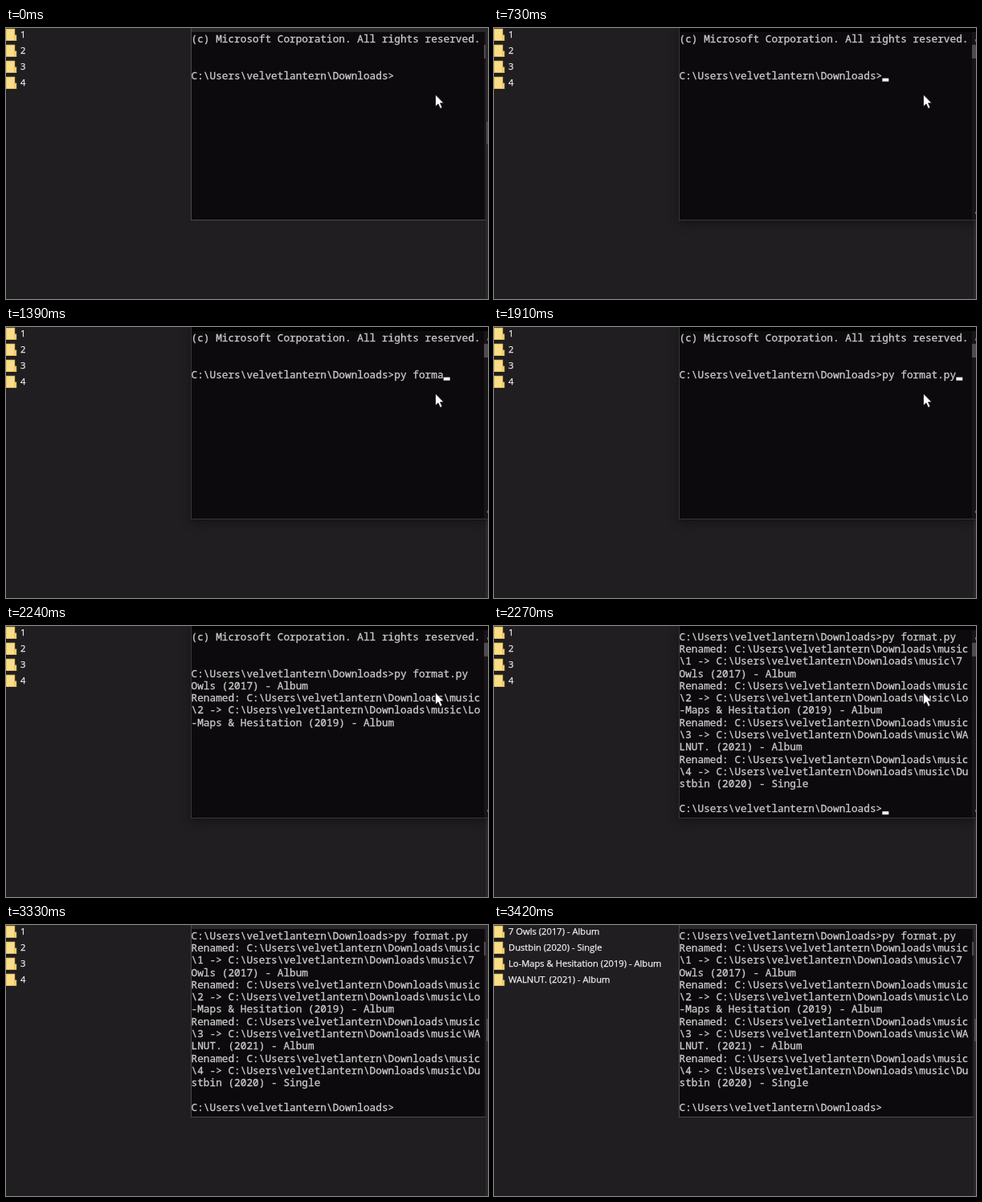
These frames come from a looping animation (600x338 px, 4.09 s). An HTML page:

```html
<!DOCTYPE html>
<html lang="en">
<head>
<meta charset="utf-8">
<title>Batch rename</title>
<style>
  html, body { margin: 0; width: 100%; height: 100%; overflow: hidden; background: #201e20; }
  body { position: relative; }
  div, pre, svg { position: absolute; margin: 0; box-sizing: border-box; }

  .folders { left: 0; top: 0; }
  .folders svg { left: 0; width: 14px; height: 17px; }
  .folders div { left: 18px; color: #f2f2f2; font: 11.2px/20.2px "Open Sans", "Noto Sans", sans-serif; white-space: pre;
    -webkit-text-stroke: .25px #f2f2f2; }

  .strip { left: 597px; top: 0; width: 3px; height: 338px; background: #2b292b; z-index: 2; }
  .strip div { left: 1px; top: 117px; width: 2px; height: 28px; background: #4b494b; }

  .console { left: 230px; top: 0; width: 371px; height: 240px; z-index: 1;
    background: #0c0a0c; border: solid #4c4a4c; border-width: 0 0 1px 1px; }
  .console.focused { z-index: 3; border-color: #383638; box-shadow: 0 3px 12px rgba(0, 0, 0, .4); }
  .title { left: 0; top: 0; width: 370px; height: 5px; background: #2a282a; }
  .focused .title { background: #030203; }
  .track { left: 364px; top: 5px; width: 6px; height: 234px; background: #171517; }
  .thumb { left: 0; top: 16px; width: 6px; height: 17px; background: #4d4b4d; }
  .tick { left: 4px; width: 2px; height: 3px; background: #6b696b; }
  pre { left: -.5px; top: 5.6px; color: #ccc; font: 12.77px/15.32px "Noto Sans Mono", "DejaVu Sans Mono", monospace;
    font-variant-ligatures: none; -webkit-text-stroke: .3px #ccc; }
  .caret { width: 7.7px; height: 3.8px; background: #f2f2f2; }
  .pointer { left: 0; top: 0; width: 14px; height: 21px; z-index: 4; }
</style>
</head>
<body>
<div class="folders"></div>
<div class="strip"><div></div></div>
<div class="console">
  <div class="title"></div>
  <pre></pre>
  <div class="caret"></div>
  <div class="track">
    <div class="thumb"></div>
    <div class="tick" style="top:9px"></div>
    <div class="tick" style="top:224px"></div>
  </div>
</div>
<svg class="pointer" viewBox="-1 -1 14 21">
  <path d="M0 0V15L3.5 11.8 6 17.4 8.6 16.2 6.1 10.8H10.6Z" fill="#fff" stroke="#0a0a0a" stroke-width=".8"/>
</svg>
<script>
const LOOP = 4090, COLS = 47, CELL_W = 7.662, CELL_H = 15.32;
const FOCUS = 180, BLUR = 3330, RELABEL = 3360;
const ENTER = 2060, REDRAW = 2240, DONE = 2270, CARET_OFF = 2850;
const home = "C:\\Users\\velvetlantern\\Downloads";
const prompt = home + ">";
const command = "py format.py";
const keyTimes = [790, 850, 940, 1030, 1090, 1180, 1270, 1390, 1520, 1610, 1790, 1880];
const albums = ["7 Owls (2017) - Album", "Lo-Maps & Hesitation (2019) - Album",
                "WALNUT. (2021) - Album", "Dustbin (2020) - Single"];

const find = selector => document.querySelector(selector);
const consoleBox = find(".console"), screen = find("pre"), caret = find(".caret"), pointer = find(".pointer");

const wrap = text => text.match(new RegExp(`.{1,${COLS}}`, "g"));
const renames = albums.map((name, i) =>
  wrap(`Renamed: ${home}\\music\\${i + 1} -> ${home}\\music\\${name}`));
const header = ["(c) Microsoft Corporation. All rights reserved.", "", ""];
const finished = [prompt + command, ...renames.flat(), "", prompt];
const halfDrawn = [...header, prompt + command, renames[0][2], ...renames[1]];

const numbers = albums.map((_, i) => String(i + 1));
const sorted = [...albums].sort();
const labels = numbers.map((_, i) => {
  const y = i * 20.15;
  find(".folders").insertAdjacentHTML("beforeend",
    `<svg style="top:${y}px" viewBox="0 0 14 17">
      <path d="M0 .8H11.2V8.6H13.2V16H0Z" fill="#dcb659"/>
      <path d="M.6 1.6H10.4V15.2H.6Z" fill="#f9dd88"/>
      <path d="M11 9.4H12.5V15.2H11Z" fill="#f3d077"/>
    </svg><div style="top:${y - 2.3}px"></div>`);
  return find(".folders").lastElementChild;
});

const setText = (node, text) => { if (node.textContent !== text) node.textContent = text; };

// Rows on screen plus the caret cell [column, row], or null while it is hidden
function terminal(t) {
  if (t >= DONE) return [finished, t < CARET_OFF ? [prompt.length, finished.length - 1] : null];
  if (t >= REDRAW) return [halfDrawn, null];
  const typed = keyTimes.filter(k => k <= t).length;
  const rows = [...header, prompt + command.slice(0, typed)];
  if (t >= ENTER) return [rows, [0, 4]];
  return [rows, t >= 730 ? [prompt.length + typed, 3] : null];
}

function pointerAt(t) {
  if (t < 2850) return [534.5, 83];
  if (t < 2880) return [548, 104];
  return t < 2910 ? [574, 146] : null;
}

function place(node, spot) {
  node.style.visibility = spot ? "visible" : "hidden";
  if (spot) node.style.transform = `translate(${spot[0]}px, ${spot[1]}px)`;
}

function render(t) {
  const [rows, cell] = terminal(t);
  setText(screen, rows.join("\n"));
  place(caret, cell && [cell[0] * CELL_W - .5, 5.4 + (cell[1] + 1) * CELL_H - 4]);
  const tip = pointerAt(t);
  place(pointer, tip && [tip[0] - 1, tip[1] - 1]);
  consoleBox.classList.toggle("focused", t >= FOCUS && t < BLUR);
  const names = t >= RELABEL ? sorted : numbers;
  labels.forEach((label, i) => setText(label, names[i]));
}

const start = performance.now();
function tick() {
  render((performance.now() - start) % LOOP);
  requestAnimationFrame(tick);
}
tick();
</script>
</body>
</html>
```
